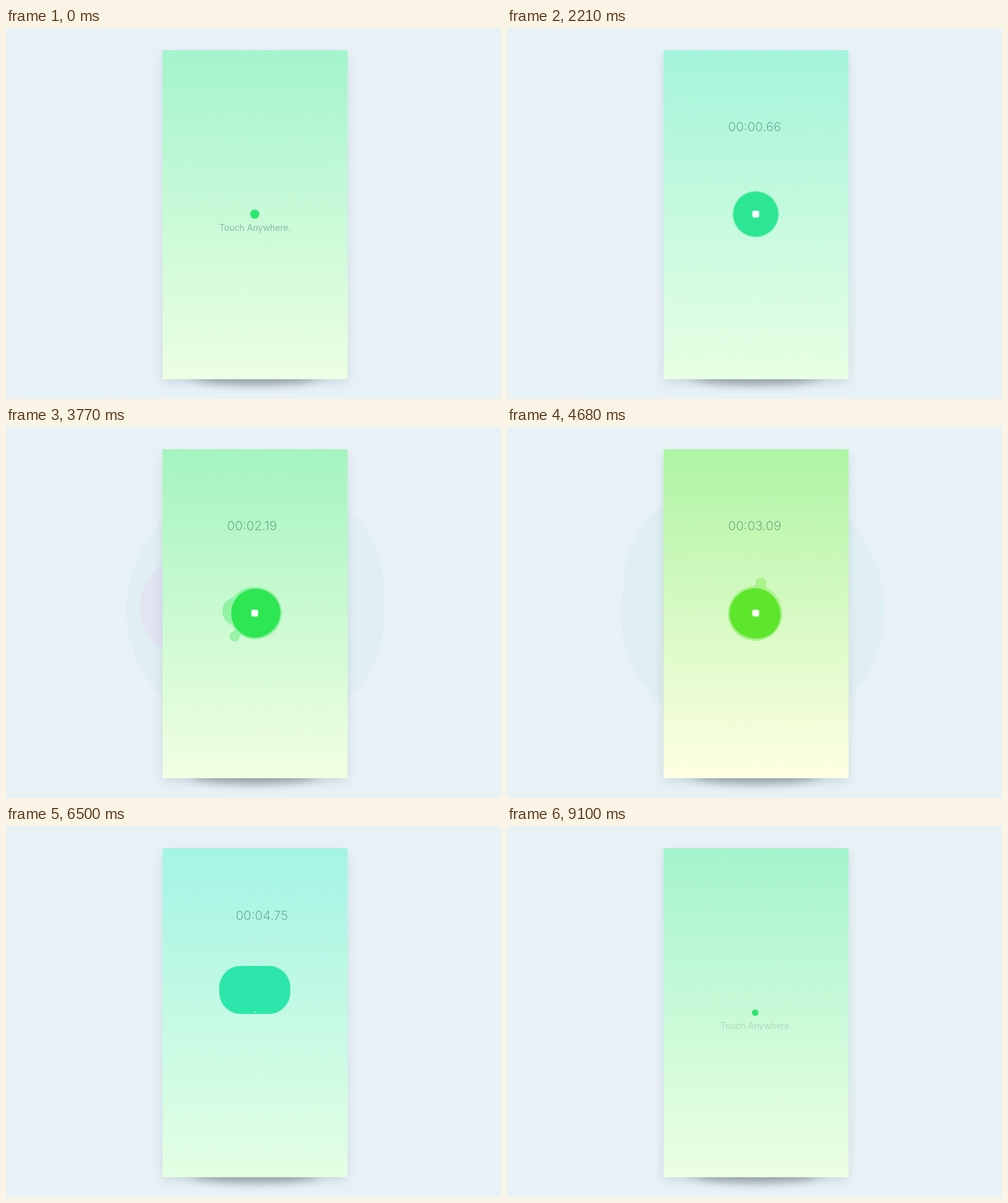
An HTML page that plays this animation: 800x600 px, repeating every 9230 ms.

```html
<!DOCTYPE html>
<html lang="en">
<head>
<meta charset="utf-8">
<title>Voice recorder</title>
<style>
html, body { margin: 0; width: 100%; height: 100%; overflow: hidden; background: #e8f1f6; }
svg { display: block; width: 800px; height: 600px; font-family: Inter, "Open Sans", sans-serif; }
</style>
</head>
<body>
<svg viewBox="0 0 800 600">
  <defs>
    <linearGradient id="sky" x1="0" y1="0" x2="0" y2="1">
      <stop id="skyTop" offset="0"/><stop id="skyEnd" offset="1"/>
    </linearGradient>
    <clipPath id="screen"><rect x="253" y="36" width="299" height="532"/></clipPath>
    <filter id="soft" x="-20%" y="-20%" width="140%" height="140%"><feGaussianBlur stdDeviation="9"/></filter>
    <filter id="under" x="-30%" y="-100%" width="160%" height="300%"><feGaussianBlur stdDeviation="12 7"/></filter>
    <filter id="goo" filterUnits="userSpaceOnUse" x="300" y="200" width="204" height="204" color-interpolation-filters="sRGB">
      <feGaussianBlur stdDeviation="2"/>
      <feColorMatrix values="1 0 0 0 0  0 1 0 0 0  0 0 1 0 0  0 0 0 14 -6.5"/>
    </filter>
  </defs>
  <rect width="800" height="600" fill="#e8f1f6"/>
  <path id="waves" fill="#e0eff1"/>
  <path id="echoes" fill="#e2e4f2"/>
  <rect x="254" y="46" width="296" height="526" fill="#7f9bb0" opacity=".34" filter="url(#soft)"/>
  <ellipse cx="402" cy="565" rx="102" ry="13" fill="#566264" opacity=".46" filter="url(#under)"/>
  <g clip-path="url(#screen)">
    <rect x="253" y="36" width="299" height="532" fill="url(#sky)"/>
    <g id="halo" opacity=".34"><path id="haloShape" filter="url(#goo)"/></g>
    <path id="dot"/>
    <rect id="bar"/>
    <rect id="stop" fill="#fff"/>
    <text id="hint" x="402.5" y="328" text-anchor="middle" font-size="14" fill="#145a43">Touch Anywhere.</text>
    <text id="timer" font-size="20.5" font-weight="300" fill="#0a4a3c"></text>
    <g id="title">
      <text x="268" y="67" font-size="13" fill="#07584e" opacity=".5">July 04</text>
      <rect id="caret" x="316.8" y="53" width="2.4" height="18" fill="#fff"/>
    </g>
    <g id="keyboard" fill="#fff" text-anchor="middle">
      <rect x="253" y="395" width="299" height="174" fill="#4c5852"/>
    </g>
  </g>
</svg>
<script>
const LOOP = 9230, STEP = 130, CX = 402, CY = 301;
const STOP = 6370;
const $ = id => document.getElementById(id);
const set = (el, attrs) => { for (const k in attrs) el.setAttribute(k, attrs[k]); return el; };
const clamp = x => Math.max(0, Math.min(1, x));
const mix = (a, b, p) => a + (b - a) * p;
const ease = (t, from, to) => {
  const p = clamp((t - from) / (to - from));
  return p * p * (3 - 2 * p);
};

// Hue of the whole screen, as [time, degrees]
const hueKeys = [[1040, 142], [2210, 153], [3770, 132], [4680, 104], [5850, 148], [7100, 172], [8320, 172], [9100, 142]];
const hueAt = t => hueKeys.reduce((hue, [time, next], i) =>
  i ? mix(hue, next, ease(t, hueKeys[i - 1][0], time)) : next, 0);

const circle = (x, y, r) => r <= 0.2 ? '' :
  `M${x - r} ${y}a${r} ${r} 0 1 1 ${2 * r} 0a${r} ${r} 0 1 1 ${-2 * r} 0Z`;

// A drop that leaves the centre and shrinks on its way
function drop(p, angle, reach, radius) {
  if (p <= 0 || p >= 1) return '';
  return circle(CX + Math.cos(angle) * reach * p, CY + Math.sin(angle) * reach * p, radius(p));
}

// Drops leave at a steady beat, swinging from side to side, with a rest every seventh beat
const BEAT = 306, FIRST_BEAT = 2105;
const swing = beat => Math.PI + 2.1 * Math.sin(.467 * (beat - 3.9));

function smallDrops(t, radius) {
  let path = '';
  for (let beat = 0; beat < 14; beat++) {
    if (beat % 7) path += drop((t - FIRST_BEAT - beat * BEAT) / 900, swing(beat), 60, p => radius * .87 * (1 - p ** 1.4));
  }
  return path;
}

// Bursts of three large drops, to the left and the right in turn
function largeDrops(t, radius) {
  let path = '';
  for (let burst = 0; burst < 4; burst++) {
    for (let i = 0; i < 3; i++) {
      const angle = (4 - 45 * i) * Math.PI / 180;
      const p = (t - 2797 - burst * 910 + 137 * i) / 850;
      path += drop(p, burst % 2 ? angle : Math.PI - angle, 295, q => radius * (1 - q));
    }
  }
  return path;
}

function wobble(x, y, r, t, amount) {
  const points = [];
  for (let i = 0; i < 60; i++) {
    const a = i * Math.PI / 30;
    const q = r * (1 + amount * (Math.sin(3 * a + t / 260) + Math.sin(2 * a - t / 390)) / 2);
    points.push(`${(x + q * Math.cos(a)).toFixed(2)} ${(y + q * Math.sin(a)).toFixed(2)}`);
  }
  return `M${points.join('L')}Z`;
}

function clock(ms) {
  const cs = Math.floor(ms / 10), pad = n => String(n).padStart(2, '0');
  return `${pad(Math.floor(cs / 6000))}:${pad(Math.floor(cs / 100) % 60)}.${pad(cs % 100)}`;
}

function add(tag, attrs, text = '') {
  const el = set(document.createElementNS('http://www.w3.org/2000/svg', tag), attrs);
  el.textContent = text;
  return $('keyboard').appendChild(el);
}

function key(x, y, w, label, size, dark) {
  const box = { x, width: w, height: 34, rx: 4 };
  add('rect', { ...box, y: y + 1, fill: '#38423d' });
  const face = add('rect', { ...box, y, fill: dark ? '#616c66' : '#858c88' });
  if (label) add('text', { x: x + w / 2, y: y + (size > 15 ? 23 : 21), 'font-size': size }, label);
  return face;
}

function buildKeyboard() {
  ['qwertyuiop', 'asdfghjkl', 'zxcvbnm'].forEach((row, line) =>
    [...row].forEach((c, i) => key(389.5 + 30 * (i - (row.length - 1) / 2), 403 + 43 * line, 25, c, 20)));
  key(254, 489, 34, '', 0, true);
  key(516, 489, 34, '', 0, true);
  key(254, 531, 33, '123', 13, true);
  key(292, 531, 32.5, '', 0, true);
  key(329.5, 531, 25.5, '', 0);
  key(359, 531, 116, 'space', 13);
  const enter = key(479.5, 531, 70.5, 'return', 13, true);
  const line = { fill: 'none', stroke: '#fff', 'stroke-width': 1.4, 'stroke-linejoin': 'round', 'stroke-linecap': 'round' };
  add('path', { ...line, d: 'M271 498.5l8 8h-4v7h-8v-7h-4z' });
  add('path', { ...line, d: 'M524 506l6-6.5h10q2 0 2 2v9q0 2-2 2h-10zM531.5 503l6 6m0-6l-6 6' });
  add('path', { ...line, 'stroke-width': 1.2, d: circle(308, 548, 7.5) + 'M303.5 549.5h9q-.7 4.3-4.5 4.3t-4.5-4.3z' });
  add('path', { d: circle(305.3, 545.6, 1.2) + circle(310.7, 545.6, 1.2) });
  add('rect', { x: 339.3, y: 540, width: 5.4, height: 10, rx: 2.7, ...line });
  add('path', { ...line, d: 'M337 547v1.5a5 5 0 0 0 10 0V547M342 553.5v2.5m-2.5 0h5' });
  return enter;
}

const enterKey = buildKeyboard();

function drawButton(t, fill) {
  const grown = ease(t, 1100, 1650), loud = ease(t, 2600, 4400);
  const fade = 1 - ease(t, 6300, 6560);
  const radius = t < STOP ? 7.4 + 28.8 * grown + 4.8 * loud : 6.3 * Math.sin(clamp((t - 8890) / 340) * Math.PI / 2);

  // The button recoils from the drops it sends out
  const angle = swing((t - FIRST_BEAT) / BEAT - 1.5), kick = -2 * loud;
  const x = CX + kick * Math.cos(angle), y = CY + kick * Math.sin(angle) * .5;
  set($('dot'), { d: radius > .2 ? wobble(x, y, radius, t, .022 * loud * (t < STOP)) : '', fill });

  const haloRadius = (radius + 1.8 + 1.5 * loud) * fade;
  const drops = smallDrops(t, haloRadius);
  set($('halo'), { fill });
  set($('haloShape'), { d: grown * fade ? circle(x, y, haloRadius) + drops : '' });
  set($('echoes'), { d: drops, transform: `translate(${CX} ${CY}) scale(3.53) translate(${-CX} ${-CY})` });

  const wave = t < 1500 ? 0 : 216 * (1 - Math.exp((1500 - t) / 800)) * fade;
  set($('waves'), { d: circle(398, 295, wave) + largeDrops(t, wave) });

  const size = 11 * ease(t, 1400, 1800) * fade;
  set($('stop'), { x: CX - size / 2, y: CY - size / 2, width: size, height: size, rx: size * .22 });
}

function draw(t) {
  const hue = hueAt(t);
  const main = `hsl(${hue} 79% 54%)`;
  set($('skyTop'), { 'stop-color': `hsl(${hue + 8} 79% 80%)` });
  set($('skyEnd'), { 'stop-color': `hsl(${hue - 43} 100% 94.5%)` });
  drawButton(t, main);

  const toBar = ease(t, STOP, 6900), out = ease(t, 8380, 8800);
  const lift = -56 * out;
  set($('bar'), {
    x: mix(361, 253, toBar), y: mix(260, 36, toBar) + lift,
    width: mix(82, 299, toBar), height: mix(82, 54.5, toBar), rx: 41 * (1 - toBar),
    fill: main, visibility: t >= STOP && out < 1 ? 'visible' : 'hidden'
  });

  set($('hint'), { opacity: .38 * (t < STOP ? 1 - ease(t, 1100, 1400) : ease(t, 8900, 9300)) });
  $('timer').textContent = clock(Math.min(4750, Math.max(0, (t - 1537) * .9835)));
  set($('timer'), {
    x: mix(357.3, 449.3, toBar), y: mix(166.5, 69, toBar) + lift,
    opacity: .43 * ease(t, 1200, 1550) * (1 - out)
  });

  set($('title'), { opacity: ease(t, 6800, 7200) * (1 - out), transform: `translate(0 ${lift})` });
  set($('caret'), { opacity: (t - 7150) % 1040 < 520 ? 1 : 0 });
  set($('keyboard'), { transform: `translate(0 ${176 * (1 - ease(t, 6600, 7200) + out)})` });
  set(enterKey, { fill: t >= 8190 && t < 8380 ? '#858c88' : '#616c66' });
}

const begin = performance.now();
function tick() {
  const t = (performance.now() - begin) % LOOP;
  draw(Math.floor(t / STEP) * STEP);
  requestAnimationFrame(tick);
}
tick();
</script>
</body>
</html>
```
